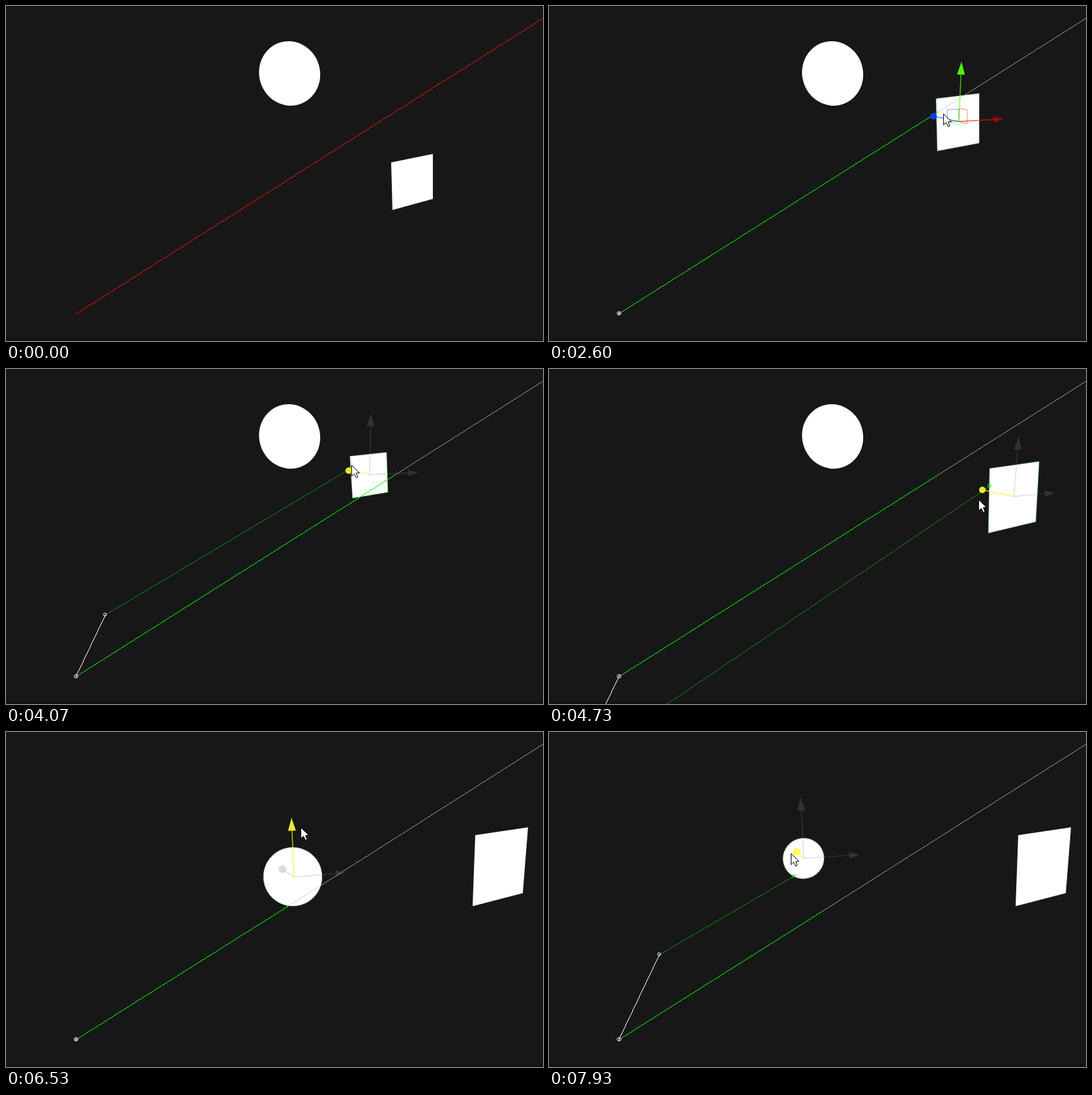
Recreate the animation shown at these times as an HTML page with a canvas. Size 824 px wide and 514 px high, loop 8000 ms.

```html
<!DOCTYPE html>
<html>
<head>
<meta charset="utf-8">
<style>
html, body { margin: 0; width: 100%; height: 100%; overflow: hidden; background: #171717; }
canvas { display: block; }
</style>
</head>
<body>
<canvas id="stage" width="824" height="514"></canvas>
<script>
const ctx = document.getElementById('stage').getContext('2d');
const LOOP = 8000;
const ORIGIN = [107, 471];
const FAR = [824, 18];
const GREEN = '#00ff00', DIM_GREEN = 'rgba(16,255,16,.5)', GRAY = 'rgba(195,195,195,.75)';
const IDLE = 'rgba(128,128,128,.26)', ACTIVE = '#ebe533';

// Rows are [key, ...values]; interpolates linearly, optionally past the last key.
function track(x, rows, extend) {
  let i = 1;
  while (i < rows.length - 1 && x > rows[i][0]) i++;
  const a = rows[i - 1], b = rows[i];
  let k = (x - a[0]) / (b[0] - a[0]);
  if (!extend) k = Math.max(0, Math.min(1, k));
  return a.slice(1).map((v, j) => v + (b[j + 1] - v) * k);
}
const mix = (a, b, k) => a.map((v, i) => v + (b[i] - v) * k);
const add = (a, b) => [a[0] + b[0], a[1] + b[1]];

const CURSOR = [
  [600, 784, 357], [850, 645, 285], [1000, 645, 285], [1350, 633, 198], [1450, 633, 198],
  [2150, 638, 105], [2250, 638, 105], [2600, 605, 165], [2700, 592, 168], [3000, 742, 222],
  [3330, 736, 220], [3400, 736, 220], [3930, 575, 165], [4070, 530, 147], [4230, 505, 142],
  [4800, 680, 208], [4950, 700, 212], [5400, 440, 105], [5670, 432, 28], [5870, 432, 28],
  [6530, 452, 146], [6700, 453, 157], [7330, 415, 222], [7530, 415, 222], [7930, 371, 186]];
const CUBE_RISE = [[1450, 0], [2150, 1]];
const CUBE_SLIDE = [
  [2700, 629], [3000, 800], [3330, 794], [3400, 794], [3930, 600],
  [4070, 558], [4230, 533], [4800, 738], [4950, 758]];
const SPHERE_DROP = [[5870, 0], [6530, 1], [6700, 1.085]];
const SPHERE_SLIDE = [[7530, 0], [7930, 1]];

// Corner offsets from the centre, by horizontal position of the centre.
const CUBE_LOW = [-33, -30, 31, -43, 31, 26, -31, 43];
const CUBE_SHAPE = [
  [558, -30, -28, 26, -34, 28, 27, -26, 36],
  [629, -35, -35, 31, -43, 31, 33, -33, 45],
  [758, -38, -47, 43, -59, 35, 42, -42, 62]];
const CUBE_HIT = [[558, -29, -10], [629, -35, -13], [758, -39, -18]];
// Tips of the up, right and depth handles.
const CUBE_AXES = [
  [558, 2, -94, 75, -3, -32, -6], [629, 4, -92, 69, -4, -39, -8], [794, 11, -92, 58, -7, -57, -12]];

// Hard-edged one pixel line.
function pixelLine(a, b, color) {
  const dx = b[0] - a[0], dy = b[1] - a[1];
  const n = Math.round(Math.max(Math.abs(dx), Math.abs(dy)));
  ctx.fillStyle = color;
  for (let i = 0; i <= n; i++)
    ctx.fillRect(Math.round(a[0] + dx * i / n), Math.round(a[1] + dy * i / n), 1, 1);
}
function path(points, fill, stroke, width = 1) {
  ctx.beginPath();
  points.forEach(p => ctx.lineTo(p[0], p[1]));
  if (points.length > 2) ctx.closePath();
  paint(fill, stroke, width);
}
function oval(c, rx, ry, fill, stroke, tilt = 0) {
  ctx.beginPath();
  ctx.ellipse(c[0], c[1], rx, ry, tilt, 0, 7);
  paint(fill, stroke, 1);
}
function paint(fill, stroke, width) {
  if (fill) { ctx.fillStyle = fill; ctx.fill(); }
  if (stroke) { ctx.strokeStyle = stroke; ctx.lineWidth = width; ctx.stroke(); }
}

function arrow(c, tip, head, shaft, width) {
  const len = Math.hypot(...tip), ux = tip[0] / len, uy = tip[1] / len;
  const size = Math.abs(uy) > .5 ? 20 : 16, half = size * .3;
  const end = add(c, tip), base = [end[0] - ux * size, end[1] - uy * size];
  path([c, base], null, shaft, width);
  path([end, [base[0] - uy * half, base[1] + ux * half], [base[0] + uy * half, base[1] - ux * half]], head);
}

// mode: 'idle', 'hoverUp', 'up' or 'depth' (the last two while dragging)
function gizmo(c, axes, mode, isCube) {
  const up = axes.slice(0, 2), right = axes.slice(2, 4), depth = axes.slice(4);
  const dragging = mode === 'up' || mode === 'depth';
  const pick = (name, color) => !dragging ? color : mode === name ? ACTIVE : IDLE;
  const shaft = (name, color) => !dragging ? color : mode === name ? 'rgba(255,238,50,.75)' : IDLE;
  if (!dragging) {
    const s = isCube ? 18 : 21;
    path([c, [c[0] - s + 1, c[1] - 1], [c[0] - s, c[1] - s], [c[0], c[1] - s - 1]], null, 'rgba(50,90,255,.6)');
    if (isCube) {
      path([c, [c[0] + 13, c[1] + 3], [c[0] + 13, c[1] - 18], [c[0], c[1] - 20]], null, 'rgba(255,60,60,.6)');
      path([c, [c[0] + 11, c[1] + 3], [c[0] - 4, c[1] + 4], [c[0] - 15, c[1] + 1]], null, 'rgba(90,255,40,.5)');
    }
  }
  arrow(c, right, pick('right', '#980b05'), shaft('right', 'rgba(235,20,15,.7)'), 1.4);
  if (isCube || dragging) {
    const ball = add(c, depth);
    path([c, ball], null, shaft('depth', 'rgba(40,80,255,.7)'), 1.4);
    const r = isCube ? 5 : 6;
    oval(ball, r, r, !isCube && mode === 'depth' ? '#ffff66' : pick('depth', '#1238ff'));
  }
  const hover = mode === 'hoverUp';
  arrow(c, up, pick('up', '#4cf50c'), shaft('up', 'rgba(85,255,20,.72)'), hover ? 3 : 1.5);
}

function castRays(hit, second, shift) {
  pixelLine(hit, FAR, GRAY);
  if (Math.abs(shift) > 1) {
    const start = [ORIGIN[0] - .477 * shift, ORIGIN[1] + shift];
    pixelLine(start, second, DIM_GREEN);
    pixelLine(ORIGIN, start, '#fff');
    oval(start, 2.3, 2.3, null, '#fff');
    oval(second, 2.5, 2.5, null, '#10d010');
  }
  pixelLine([ORIGIN[0], ORIGIN[1] + .5], hit, GREEN);
  const [x, y] = [ORIGIN[0] + .5, ORIGIN[1] + .5];
  oval([x, y], 3, 2.6, null, '#fff');
  path([[x, y - 2], [x, y + 2]], null, '#fff');
  if (Math.abs(shift) <= 1) {
    path([[x - 2, y + .5], [x + 2, y + .5]], null, '#fff');
    oval(hit, 1.3, 1.3, GREEN);
  }
}

function cursor([x, y]) {
  const shape = [[0, 0], [0, 17], [4, 13.3], [7, 19.5], [9.6, 18.4], [7, 12.3], [12, 12]];
  path(shape.map(p => [x + p[0] + .5, y + p[1] + .5]), '#fff', '#000');
}

function draw(t) {
  ctx.fillStyle = '#171717';
  ctx.fillRect(0, 0, 824, 514);
  ctx.fillStyle = '#121212';
  ctx.fillRect(0, 510, 824, 4);

  // cube
  const [rise] = track(t, CUBE_RISE), [u] = track(t, CUBE_SLIDE);
  const slide = u - 629;
  const cube = mix([624, 270], [u, 177.3 + .216 * slide], rise);
  const shape = mix(CUBE_LOW, track(u, CUBE_SHAPE, true), rise);
  const corners = [0, 2, 4, 6].map(i => add(cube, shape.slice(i, i + 2)));
  const cubeSelected = t >= 900 && t < 5430;
  path(corners, '#fff', cubeSelected && 'rgba(140,255,140,.55)');

  // sphere
  const [drop] = track(t, SPHERE_DROP), [away] = track(t, SPHERE_SLIDE);
  const [sx, sy, rx, ry] = mix(
    mix([435.2, 103.5, 46.7, 49.7], [440, 222, 45, 45], Math.min(drop, 1)), [390.5, 194, 31.5, 31], away);
  const sphere = [sx, sy + (drop > 1 ? (drop - 1) * 119 * (1 - away) : 0)];
  const sphereSelected = t >= 5430;
  oval(sphere, rx, ry, '#fff', sphereSelected && 'rgba(140,255,140,.55)', -.3);

  // rays
  if (drop > .87) {
    const hit = mix([432, 267], [420, 274], Math.max(0, drop - 1) / .085);
    castRays(hit, add(sphere, mix([-20, 42], [-15, 27], away)), -130 * away);
  } else if (rise > .75) {
    const second = add(cube, track(u, CUBE_HIT, true));
    castRays([595, 163], second, slide / (.692 - .000885 * slide));
  } else {
    pixelLine([107, 472], FAR, '#ff0c00');
  }

  // handles
  if (cubeSelected) {
    const mode = t >= 1400 && t < 2230 ? 'up' : t >= 2670 && t < 5000 ? 'depth' : 'idle';
    gizmo(cube, track(u, CUBE_AXES, true), mode, true);
  } else if (sphereSelected) {
    const mode = t < 5640 ? 'idle' : t < 5860 ? 'hoverUp' : t < 7100 ? 'up' : 'depth';
    const axes = mix(mix([-4, -97, 83, 0, -20, -15], [-4, -91, 80, -7, -18, -12], Math.min(drop, 1)),
      [-5, -94, 86, -6, -11, -10], away);
    gizmo(add(sphere, mix([2, .5], [.5, 0], away)), axes, mode, false);
  }

  if (t >= 580) cursor(track(t, CURSOR));
}

function frame() {
  draw(performance.now() % LOOP);
  requestAnimationFrame(frame);
}
frame();
</script>
</body>
</html>
```
